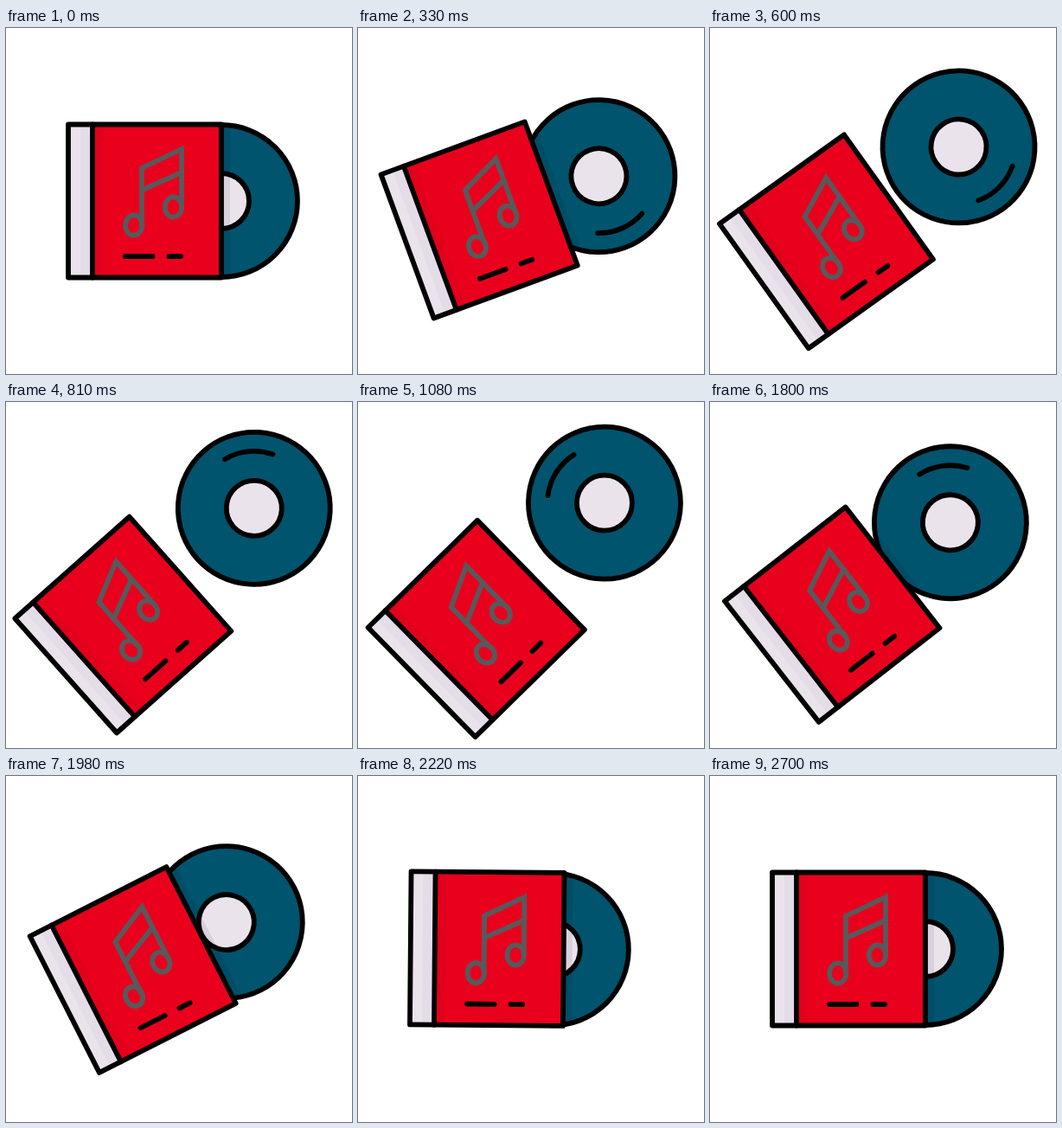
Animation of 400x400 px, one loop 3230 ms. Source, as an HTML page with a canvas:

```html
<!DOCTYPE html>
<html>
<head>
<meta charset="utf-8">
<title>Disc and case</title>
<style>
  html, body { margin: 0; width: 100%; height: 100%; overflow: hidden; background: #fff; }
  canvas { display: block; }
</style>
</head>
<body>
<canvas id="stage" width="400" height="400"></canvas>
<script>
const ctx = document.getElementById('stage').getContext('2d');
const LOOP = 3230, STEP = 30, RAD = Math.PI / 180;
const BLACK = '#000', RED = '#e9001d', DARK_RED = '#e2001c', TEAL = '#00546d',
      PALE = '#eae3ec', DARK_PALE = '#e4dde7', GRAY = '#58595b';

const mix = (p1, p2, s) => 3 * s * (1 - s) ** 2 * p1 + 3 * s * s * (1 - s) * p2 + s ** 3;

function bezier(x1, y1, x2, y2) {
  return x => {
    if (x <= 0) return 0;
    if (x >= 1) return 1;
    let lo = 0, hi = 1;
    for (let i = 0; i < 24; i++) {
      const mid = (lo + hi) / 2;
      if (mix(x1, x2, mid) < x) lo = mid; else hi = mid;
    }
    return mix(y1, y2, lo);
  };
}

const open = bezier(.25, .15, .35, 1);
const swingBack = bezier(.83, 0, .31, 1.42);
const slideBack = bezier(.83, 0, .31, 1.55);
const spinBack = bezier(.56, 0, .45, 1);
const sine = x => (1 - Math.cos(Math.PI * Math.min(1, Math.max(0, x)))) / 2;

// Rises to 1 with the opening curve, then returns to 0 with its own curve.
const outAndBack = (t, rise, back, start, end) =>
  open(t / rise) - back((t - start) / (end - start));

function pose(t) {
  return {
    tilt: -44.5 * outAndBack(t, 1130, swingBack, 1300, 2690),
    gap: 119 * outAndBack(t, 1050, slideBack, 1135, 2655),
    spin: 240 - 1063 * outAndBack(t, 1070, spinBack, 1100, 2660),
    shift: -17 * (sine((t - 1780) / 490) - sine((t - 2270) / 430))
  };
}

function paint(fill, stroke, width = 5.8) {
  if (fill) { ctx.fillStyle = fill; ctx.fill(); }
  if (stroke) { ctx.strokeStyle = stroke; ctx.lineWidth = width; ctx.stroke(); }
}

function circle(x, y, r, fill, stroke) {
  ctx.beginPath();
  ctx.arc(x, y, r, 0, 2 * Math.PI);
  paint(fill, stroke);
}

function box(x, y, w, h, fill, stroke) {
  ctx.beginPath();
  ctx.rect(x, y, w, h);
  paint(fill, stroke);
}

function line(color, ...points) {
  ctx.beginPath();
  points.forEach(([x, y]) => ctx.lineTo(x, y));
  paint(null, color);
}

function noteHead(x, y) {
  ctx.beginPath();
  ctx.ellipse(x, y, 9.7, 11.7, 0, 0, 2 * Math.PI);
  paint(null, GRAY);
}

function drawDisc(x, spin, caseEdge) {
  circle(x, 200, 88, TEAL);
  circle(x, 200, 32, PALE);
  ctx.save();
  ctx.beginPath();
  ctx.arc(x, 200, 88, 0, 2 * Math.PI);
  ctx.clip();
  box(caseEdge - 60, 100, 70, 200, 'rgba(0,0,40,.08)');
  ctx.restore();
  circle(x, 200, 88, null, BLACK);
  circle(x, 200, 32, null, BLACK);
  ctx.beginPath();
  ctx.arc(x, 200, 66, (spin - 25) * RAD, (spin + 25) * RAD);
  paint(null, BLACK);
}

function drawCase() {
  box(72, 111.5, 28, 177, PALE);
  box(86, 111.5, 14, 177, DARK_PALE);
  box(100, 111.5, 149, 177, RED);
  box(100, 111.5, 13, 177, DARK_RED);
  box(72, 111.5, 177, 177, null, BLACK);
  line(BLACK, [100, 111.5], [100, 288.5]);
  line(BLACK, [138, 264], [169.5, 264]);
  line(BLACK, [188.5, 264], [202, 264]);
  ctx.lineJoin = 'miter';
  line(GRAY, [157, 228], [157, 162], [203, 140], [203, 207]);
  ctx.lineJoin = 'round';
  line(GRAY, [157, 187.5], [203, 166.8]);
  noteHead(147.8, 228);
  noteHead(193.5, 207);
}

function draw(t) {
  const { tilt, gap, spin, shift } = pose(t);
  const caseMove = -.412 * gap, discMove = .588 * gap;
  ctx.fillStyle = '#fff';
  ctx.fillRect(0, 0, 400, 400);
  ctx.save();
  ctx.lineCap = ctx.lineJoin = 'round';
  ctx.translate(200 + shift, 200);
  ctx.rotate(tilt * RAD);
  ctx.translate(-200, -200);
  drawDisc(249 + discMove, spin, 249 + caseMove);
  ctx.translate(caseMove, 0);
  drawCase();
  ctx.restore();
}

function tick() {
  const t = performance.now() % LOOP;
  draw(Math.min(2700, Math.floor(t / STEP) * STEP));
  requestAnimationFrame(tick);
}
tick();
</script>
</body>
</html>
```
